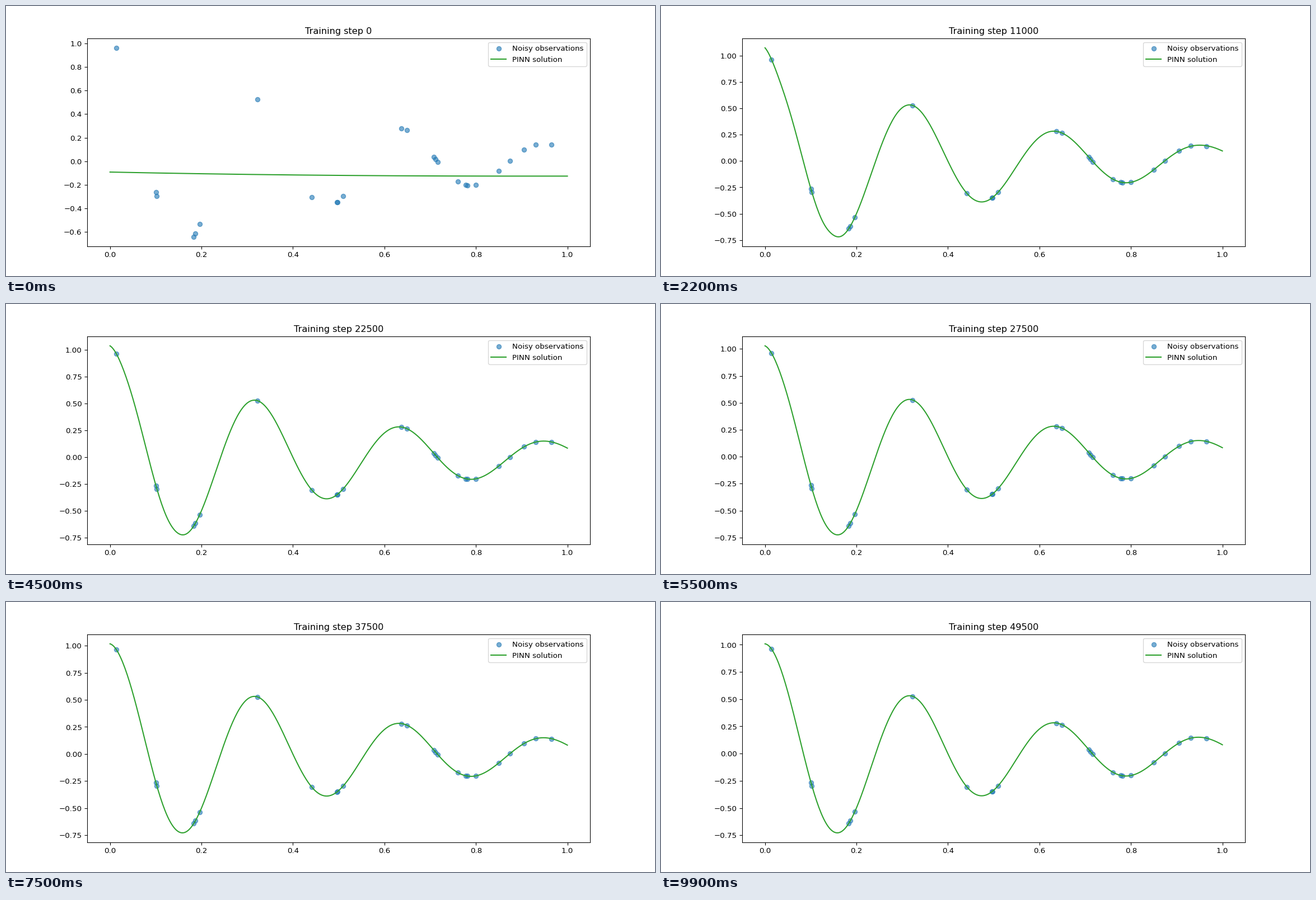
These frames come from a looping animation (1159x483 px, 10 s). A matplotlib script:

```python
import numpy as np
import matplotlib.pyplot as plt
from matplotlib.animation import FuncAnimation

FRAMES, INTERVAL, STEPS_PER_FRAME = 100, 100, 500
FITTED = 8  # frame from which the whole curve follows the data
DAMPING, OMEGA0 = 2, 20

plt.rcParams["font.family"] = "DejaVu Sans"


def oscillator(x):
    """Underdamped oscillator released at rest from u = 1."""
    w = np.sqrt(OMEGA0**2 - DAMPING**2)
    phi = np.arctan(-DAMPING / w)
    return np.exp(-DAMPING * x) * np.cos(phi + w * x) / np.cos(phi)


def edge_error(dist, zero, width):
    """Overshoot at a border that changes sign and fades inwards."""
    return (1 - dist / zero) * np.exp(-(dist / width) ** 2)


# Irregular sampling times of the measurements
x_obs = np.array([
    0.0138, 0.1004, 0.1025, 0.183, 0.1867, 0.1963, 0.3228, 0.4412, 0.4965,
    0.4971, 0.5098, 0.6375, 0.6494, 0.7076, 0.7122, 0.7168, 0.7608, 0.778,
    0.7808, 0.7997, 0.8503, 0.8741, 0.905, 0.9309, 0.9654,
])
u_obs = oscillator(x_obs)

x = np.linspace(0, 1, 400)
exact = oscillator(x)
untrained = -0.1265 + 0.0345 * np.abs(1 - x / 0.93) ** 2.2
head_error = edge_error(x, 0.0145, 0.042)
tail_error = edge_error(1 - x, 0.05, 0.07)
trough_error = np.exp(-((x - 0.145) / 0.02) ** 2)


def trained(k):
    """Exact solution plus errors that die away as training goes on."""
    age = k - FITTED
    head = 0.107 * np.exp(-age / 36)
    tail = 0.08 * np.exp(-age / 6) + 0.011 * np.exp(-age / 50)
    trough = 0.028 * np.exp(-age / 30)
    return (exact + head * head_error + tail * tail_error
            + trough * trough_error)


def prediction(k):
    """The fit sweeps from the large swings on the left to the right end."""
    progress = min(k / FITTED, 1)
    s = np.clip((1.3 * progress - x) / 0.3, 0, 1)
    fit = s * s * (3 - 2 * s)
    return (1 - fit) * (1 - progress) * untrained + fit * trained(k)


fig, ax = plt.subplots(figsize=(12, 5), dpi=96.61)  # 1159 x 483 pixels
ax.scatter(x_obs, u_obs, color="tab:blue", alpha=0.6,
           label="Noisy observations")
line, = ax.plot(x, untrained, color="tab:green", label="PINN solution")
ax.set_xlim(-0.05, 1.05)
ax.legend(loc="upper right")
title = ax.set_title("")


def update(k):
    u = prediction(k)
    line.set_ydata(u)
    low, high = min(u.min(), u_obs.min()), max(u.max(), u_obs.max())
    pad = 0.05 * (high - low)
    ax.set_ylim(low - pad, high + pad)
    title.set_text(f"Training step {k * STEPS_PER_FRAME}")
    return line, title


anim = FuncAnimation(fig, update, frames=FRAMES, interval=INTERVAL,
                     repeat=True, repeat_delay=0, blit=False)
plt.show()
```
